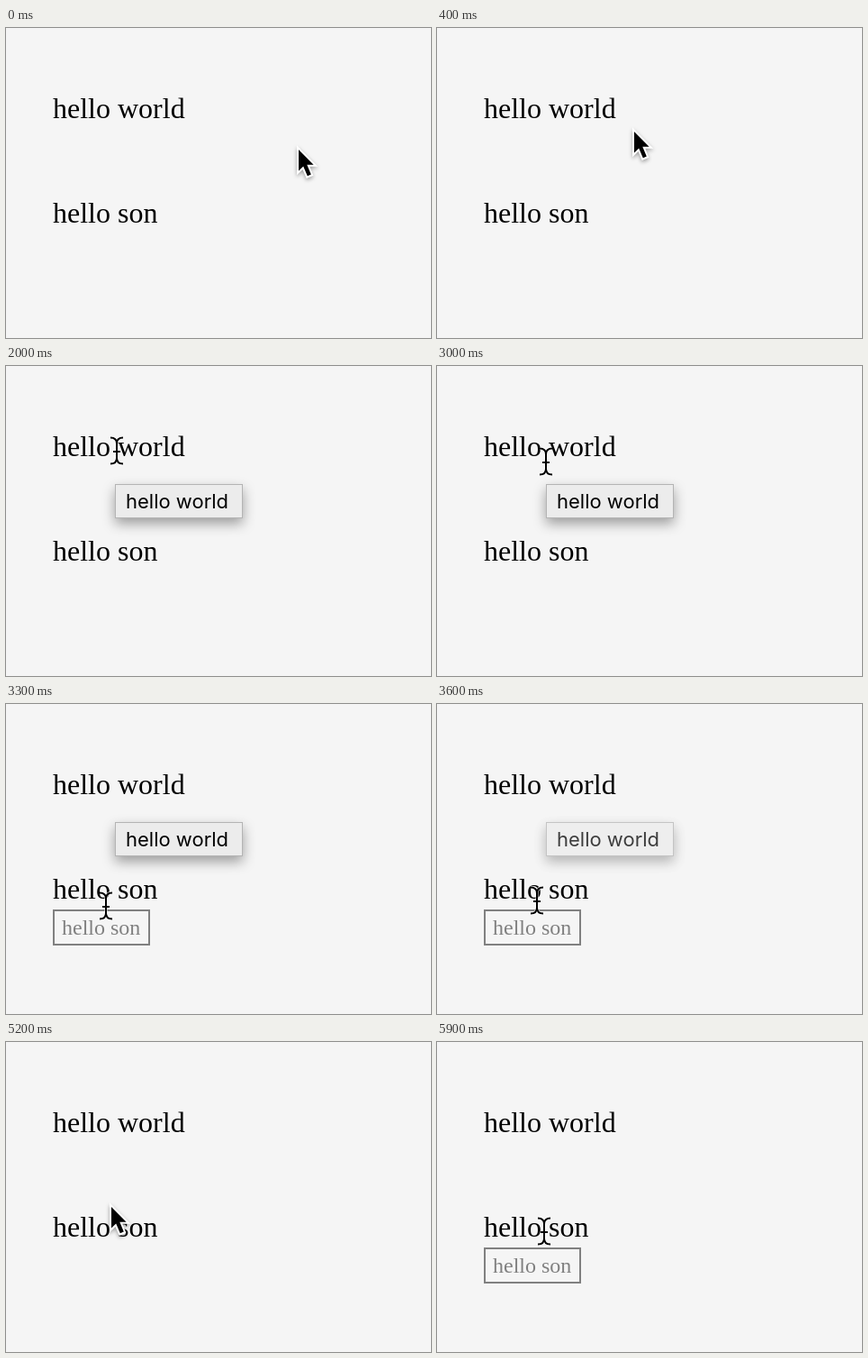
Write an HTML page that moves like this. It is 472 by 344 pixels and loops after 6100 ms.

```html
<!DOCTYPE html>
<html lang="en">
<head>
<meta charset="utf-8">
<title>Tooltip comparison</title>
<style>
html, body { margin: 0; width: 100%; height: 100%; overflow: hidden; background: #f5f5f5; }
svg { display: block; width: 472px; height: 344px; }
text { font-family: "Liberation Serif", Times, serif; font-size: 32px; }
#hint text { font-size: 24px; fill: #808080; }
#tip text { font-family: Inter, sans-serif; font-size: 22px; }
#tip rect { fill: #ececec; stroke: #b4b4b4; filter: drop-shadow(0 6px 7px rgba(0, 0, 0, .36)); }
#arrow { filter: drop-shadow(0 2px 2px rgba(0, 0, 0, .35)); }
</style>
</head>
<body>
<svg viewBox="0 0 472 344">
  <text x="52" y="100">hello world</text>
  <text x="52" y="216">hello son</text>
  <g id="hint">
    <rect x="53" y="229" width="106" height="38" fill="none" stroke="#808080" stroke-width="2"/>
    <text x="62" y="256">hello son</text>
  </g>
  <g id="tip">
    <rect x="121.5" y="131.5" width="141" height="37"/>
    <text x="133" y="158">hello world</text>
  </g>
  <path id="arrow" d="M1 1V24.5L6.2 19.5 10.8 30.3 14.8 28.6 10.3 17.8H17.6Z"
    stroke="#fff" stroke-width="4" paint-order="stroke"/>
  <g id="beam" fill="none">
    <path id="shape" stroke="#fff" stroke-width="3.4" stroke-opacity=".7"
      d="M-7-14.5Q0-14.5 0-8Q0-14.5 7-14.5M-7 14.5Q0 14.5 0 8Q0 14.5 7 14.5M0-9V9M-4 1H4"/>
    <use href="#shape" id="ink"/>
  </g>
</svg>
<script>
const LOOP = 6100, STEP = 100;
const $ = id => document.getElementById(id);
const hint = $("hint"), tip = $("tip"), arrow = $("arrow"), beam = $("beam");

// The same outline in black over its white halo
const ink = $("shape").cloneNode();
ink.removeAttribute("id");
ink.setAttribute("stroke", "#000");
ink.setAttribute("stroke-width", "2");
ink.setAttribute("stroke-opacity", "1");
$("ink").replaceWith(ink);

// Pointer: time, x, y, kind (a = arrow, i = text beam)
const path = [
  [0, 324, 134, "a"], [100, 324, 134, "a"], [200, 312, 132, "a"],
  [400, 218, 114, "a"], [500, 172, 98, "i"], [600, 134, 94, "i"],
  [700, 119, 94, "i"], [900, 119, 94, "i"], [1000, 123, 94, "i"],
  [2900, 123, 94, "i"], [3000, 121, 106, "i"], [3100, 115, 146, "a"],
  [3200, 112, 196, "i"], [3300, 111, 224, "i"], [3400, 111, 224, "i"],
  [3600, 111, 218, "i"], [3700, 111, 214, "i"], [5000, 111, 214, "i"],
  [5100, 115, 176, "a"], [5200, 116, 182, "a"], [5400, 116, 182, "a"],
  [5500, 118, 206, "i"], [5600, 119, 210, "i"], [LOOP, 119, 210, "i"]
];

const clamp = v => Math.max(0, Math.min(1, v));

function pointer(t) {
  const n = path.findIndex(p => p[0] > t);
  const [a, b] = [path[n - 1], path[n]];
  const k = (t - a[0]) / (b[0] - a[0]);
  return { x: a[1] + (b[1] - a[1]) * k, y: a[2] + (b[2] - a[2]) * k, kind: a[3] };
}

function draw(now) {
  const t = Math.floor(now % LOOP / STEP) * STEP;
  const { x, y, kind } = pointer(t);
  const [shown, hidden] = kind === "a" ? [arrow, beam] : [beam, arrow];
  shown.setAttribute("transform", `translate(${x} ${y})`);
  shown.style.display = "";
  hidden.style.display = "none";
  hint.style.display = t >= 3200 && t < 5100 || t >= 5500 ? "" : "none";
  tip.style.opacity = t < 2000 ? 0 : clamp((3900 - t) / 400);
}

const start = performance.now();
function tick() {
  draw(performance.now() - start);
  requestAnimationFrame(tick);
}
tick();
</script>
</body>
</html>
```
